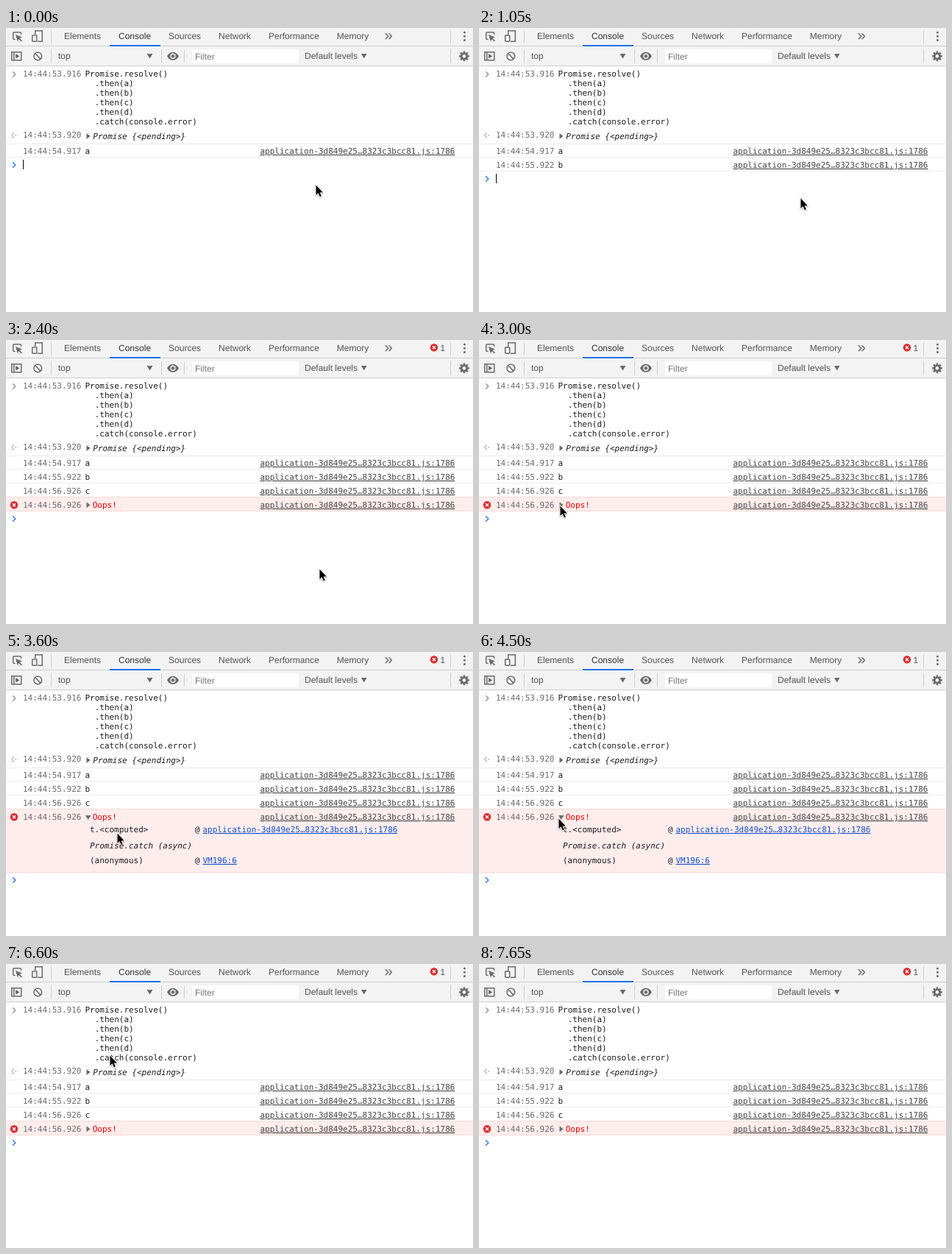
Animation of 635x386 px, one loop 8250 ms. Source, as an HTML page:

```html
<!DOCTYPE html>
<html lang="en">
<head>
<meta charset="utf-8">
<title>Console promise chain</title>
<style>
  html, body { margin: 0; width: 100%; height: 100%; overflow: hidden; background: #fff; }
  svg { display: block; width: 635px; height: 386px; }
  text { white-space: pre; text-rendering: geometricPrecision; }
  .ui { font: 12px "Liberation Sans", Arial, sans-serif; fill: #505050; }
  .mono { font: 11px "DejaVu Sans Mono", Menlo, monospace; fill: #1c1c1c; }
  .time { fill: #6b6b6b; }
  .link { fill: #454545; text-decoration: underline; }
  .blue { fill: #1150cc; text-decoration: underline; }
  .red { fill: #f00; }
  .it { font-style: italic; }
  .line { fill: none; stroke: #6a6a6a; stroke-width: 1.5; }
  .solid { fill: #6a6a6a; }
  #mouse { filter: drop-shadow(0 1px 1px #0005); }
</style>
</head>
<body>
<svg viewBox="0 0 635 386">
  <defs>
    <g id="bad">
      <circle r="5.2" fill="#e0282b"/>
      <path d="M-2 -2L2 2M2 -2L-2 2" stroke="#fff" stroke-width="1.4"/>
    </g>
    <path id="chevron" d="M9 -3.7L12.8 0L9 3.7" fill="none" stroke-width="1.5"/>
  </defs>

  <rect width="635" height="51" fill="#f3f3f3"/>
  <path d="M0 24.5H635M0 51.5H635M61.5 3V21M604.5 3V21M61.5 29V47M211.5 29V47M242.5 29V47M604.5 29V47" stroke="#ccc" fill="none"/>
  <rect x="141" y="23" width="69" height="2" fill="#1a73e8"/>
  <rect x="253" y="29" width="145" height="19" fill="#fff"/>

  <!-- tab bar icons -->
  <path class="line" d="M12.5 15.5H11Q9.7 15.5 9.7 14V7Q9.7 5.7 11 5.7H19Q20.5 5.7 20.5 7V9"/>
  <path class="solid" d="M13 9L22 12.5L18.6 13.8L22 17.2L20.7 18.5L17.3 15.1L15.8 18.5Z"/>
  <path class="line" d="M39.7 9V3.7H49.3V18.3H43"/>
  <rect class="line" x="35.7" y="10" width="6" height="8.3" rx=".7"/>
  <path class="line" d="M516 7.3L519.7 11.3L516 15.3M520.7 7.3L524.4 11.3L520.7 15.3"/>
  <path d="M623.5 6V17" fill="none" stroke="#6a6a6a" stroke-width="3" stroke-linecap="round" stroke-dasharray="0 5.3"/>

  <!-- toolbar icons -->
  <path class="line" d="M7.7 32.7H20.8V43.8H7.7ZM10.8 33V44"/>
  <path class="solid" d="M13 35L18.5 38.2L13 41.5Z"/>
  <circle class="line" cx="43.3" cy="38.3" r="5.4"/>
  <path class="line" d="M39.5 34.5L47.1 42.1"/>
  <path class="solid" d="M191.5 35H199.5L195.5 41.5ZM483 35H490.5L486.7 41.5Z"/>
  <path class="solid" fill-rule="evenodd" d="M219 38.2Q222 32.7 227 32.7T235 38.2Q232 43.7 227 43.7T219 38.2ZM227 34.5A3.7 3.7 0 1 0 227 41.9A3.7 3.7 0 1 0 227 34.5Z"/>
  <circle class="solid" cx="227" cy="38.2" r="2.2"/>
  <circle class="line" cx="623" cy="38.3" r="3.9" style="stroke-width:3"/>
  <circle class="line" cx="623" cy="38.3" r="6" pathLength="16" stroke-dasharray="1 1" stroke-dashoffset=".5" style="stroke-width:2"/>

  <g id="page">
    <use href="#chevron" y="63" stroke="#999"/>
    <path d="M11 142.5L7.5 146L11 149.5" fill="none" stroke="#bbb" stroke-width="1.3"/>
    <circle cx="13.3" cy="146" r="1" fill="#bbb"/>
    <path class="solid" d="M109.5 143L114.5 147L109.5 151Z"/>
  </g>
  <g id="badge"><use href="#bad" x="582" y="10.3"/><text class="ui" x="590.5" y="15">1</text></g>
  <g id="log-b"></g>
  <g id="log-c"></g>
  <g id="error">
    <rect id="pink" y="213" width="635" fill="#ffeded"/>
    <path d="M0 213.5H635" stroke="#ffd6d6"/>
    <path id="pink-end" d="M0 .5H635" stroke="#ffd6d6"/>
    <use href="#bad" x="11" y="224.3"/>
    <path id="arrow" class="solid"/>
  </g>
  <g id="trace"></g>
  <g id="prompt">
    <use href="#chevron" stroke="#367cf1"/>
    <rect id="caret" x="23" y="-7" width="1" height="13" fill="#000"/>
  </g>
  <path id="mouse" d="M.5 .5V14L3.6 11.2L5.8 16.3L7.8 15.4L5.7 10.5H9.8Z" fill="#000" stroke="#fff" stroke-width="1.6" paint-order="stroke"/>
</svg>
<script>
const LOOP = 8250, STEP = 150;
const ROW = 19, LINE = 13, TAB_GAP = 24;
const FILE = "application-3d849e25…8323c3bcc81.js:1786";
const $ = id => document.getElementById(id);

function add(parent, tag, attrs, content = "") {
  const el = document.createElementNS("http://www.w3.org/2000/svg", tag);
  for (const key in attrs) el.setAttribute(key, attrs[key]);
  el.textContent = content;
  parent.append(el);
  return el;
}
const label = (parent, x, y, content, cls = "") =>
  add(parent, "text", { x, y, class: cls === "ui" ? cls : "mono " + cls }, content);
const rule = (parent, y) => add(parent, "path", { d: `M0 ${y}H635`, stroke: "#ececec" });

function logRow(parent, index, time, message, x = 107.5, cls) {
  const y = 171 + ROW * index;
  label(parent, 23, y, time, "time");
  label(parent, x, y, message, cls);
  label(parent, 345.5, y, FILE, "link");
  if (cls !== "red") rule(parent, y + 4.5);
}

const page = $("page");
let tabX = 79;
for (const name of ["Elements", "Console", "Sources", "Network", "Performance", "Memory"]) {
  const tab = label(page, tabX, 15, name, "ui");
  if (name === "Console") tab.style.fill = "#333";
  tabX += tab.getComputedTextLength() + TAB_GAP;
}
label(page, 71, 42, "top", "ui");
label(page, 257, 43, "Filter", "ui").style.fill = "#757575";
label(page, 406, 42, "Default levels", "ui");

label(page, 23, 66, "14:44:53.916", "time");
["Promise.resolve()", "  .then(a)", "  .then(b)", "  .then(c)", "  .then(d)", "  .catch(console.error)"]
  .forEach((code, i) => label(page, 107.5, 66 + LINE * i, code));
label(page, 23, 149, "14:44:53.920", "time");
label(page, 118.3, 151, "Promise {<pending>}", "it");
rule(page, 157.5);

logRow(page, 0, "14:44:54.917", "a");
logRow($("log-b"), 1, "14:44:55.922", "b");
logRow($("log-c"), 2, "14:44:56.926", "c");
logRow($("error"), 3, "14:44:56.926", "Oops!", 117.7, "red");

const trace = $("trace");
function call(y, name, place) {
  label(trace, 114, y, name);
  label(trace, 257, y, "@");
  label(trace, 267.5, y, place, "blue");
}
call(245, "t.<computed>", FILE);
label(trace, 114, 267, "Promise.catch (async)", "it");
call(287, "(anonymous)", "VM196:6");

// Pointer moves: start, end, destination
const HOME = [421, 213];
const MOVES = [
  [0, 150, 429, 214],
  [300, 1050, 437, 231],
  [1050, 1650, 631, 366],
  [1950, 3000, 110, 225],
  [3300, 3900, 192, 267],
  [3900, 4500, 108, 226],
  [4650, 5550, 117, 223],
  [5850, 6900, 147, 100],
  [6900, 7200, 183, 103],
  [7350, 7500, 192, 110]
];
const B_AT = 450, C_AT = 1500, OPEN_AT = 3150, CLOSE_AT = 4950, HIDE_AT = 7650;
const BLUR_AT = 3000, BLINK = 530, BLINK_PHASE = 405;

const smooth = k => k * k * (3 - 2 * k);
function pointer(t) {
  let [x, y] = HOME;
  for (const [from, to, toX, toY] of MOVES) {
    const k = smooth(Math.min(1, Math.max(0, (t - from) / (to - from))));
    x += (toX - x) * k;
    y += (toY - y) * k;
  }
  return [x, y].map(Math.round);
}
const show = (id, on) => $(id).setAttribute("visibility", on ? "visible" : "hidden");
const shift = (id, x, y) => $(id).setAttribute("transform", `translate(${x} ${y})`);

function draw(t) {
  const hasB = t >= B_AT, failed = t >= C_AT;
  const open = t >= OPEN_AT && t < CLOSE_AT;
  const end = open ? 299 : 232;
  show("log-b", hasB);
  for (const id of ["log-c", "error", "badge"]) show(id, failed);
  show("trace", open);
  $("pink").setAttribute("height", end - 213);
  shift("pink-end", 0, end);
  $("arrow").setAttribute("d", open ? "M108 222H115.5L111.7 228Z" : "M109.5 220.3L114.5 224.3L109.5 228.3Z");

  const rows = failed ? 3 : hasB ? 1 : 0;
  shift("prompt", 0, open ? 310 : 186 + ROW * rows);
  show("caret", t < BLUR_AT && (t + BLINK_PHASE) % (2 * BLINK) < BLINK);
  show("mouse", t < HIDE_AT);
  shift("mouse", ...pointer(t));
}

const start = performance.now();
function tick() {
  const t = (performance.now() - start) % LOOP;
  draw(Math.floor(t / STEP) * STEP);
  requestAnimationFrame(tick);
}
tick();
</script>
</body>
</html>
```
